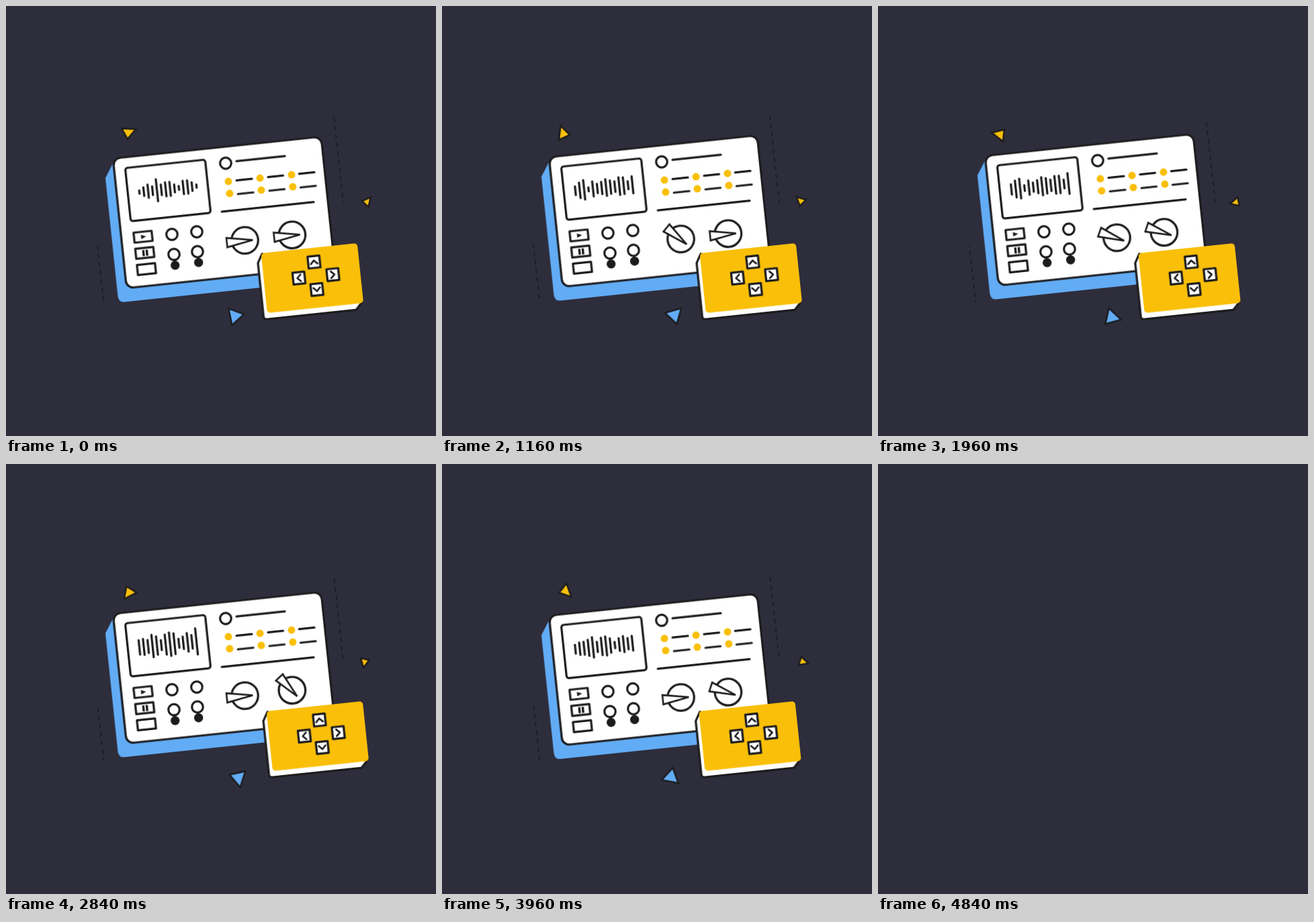
Recreate the animation shown at these times as an HTML page without scripts. Size 640 by 640 pixels, loop 4880 ms.

```html
<!DOCTYPE html>
<html lang="en">
<head>
<meta charset="utf-8">
<title>Control panel</title>
<style>
  :root { --ink: #1c1c1e; --blue: #62acf5; --gold: #fabf08; --loop: 4.88s; --sine: cubic-bezier(.37, 0, .63, 1); }
  html, body { margin: 0; width: 100%; height: 100%; overflow: hidden; background: #2e2d3c; }
  svg { display: block; width: 100%; height: 100%; }

  .line { fill: none; stroke: var(--ink); stroke-width: 3.2; stroke-linecap: round; stroke-linejoin: round; }
  .paper { fill: #fff; }
  .ink { fill: var(--ink); }
  .gold { fill: var(--gold); }
  .blue { fill: var(--blue); }

  .scene { animation: vanish var(--loop) step-end infinite; }
  .lift { animation: lift var(--loop) var(--sine) infinite; }
  .slide { animation: slide var(--loop) var(--sine) infinite; }
  .spin { stroke: var(--ink); stroke-width: 2.5; animation: spin var(--loop) linear infinite; }
  .spin.blue { animation-direction: reverse; }
  .dash { stroke: var(--ink); stroke-width: 1.7; stroke-dasharray: 6.6 5.95; animation: crawl var(--loop) linear infinite; }
  .pointer { stroke-width: 2.6; stroke-linejoin: miter; }
  .first { animation: turn-first var(--loop) var(--sine) infinite; }
  .second { animation: turn-second var(--loop) var(--sine) infinite; }
  .bars rect { width: 3.2px; rx: 1.6px; fill: var(--ink); animation: level var(--loop) var(--sine) infinite; }

  @keyframes vanish { 99.18%, to { visibility: hidden; } }
  @keyframes lift { 50% { transform: translateY(-4.3px); } }
  @keyframes slide { 50% { transform: translateX(8.6px); } }
  @keyframes spin { to { transform: rotate(-360deg); } }
  @keyframes crawl { from { stroke-dashoffset: -.8; } to { stroke-dashoffset: 11.75; } }
  @keyframes turn-first {
    0%, 58.2%, to { transform: rotate(0deg); }
    24.6% { transform: rotate(45deg); }
  }
  @keyframes turn-second {
    0%, 22.1%, 99.2%, to { transform: rotate(0deg); }
    60.7% { transform: rotate(53deg); }
  }
  /* Each bar eases between three lengths, centred on the axis. */
  @keyframes level {
    0%, 98.4%, to { height: var(--a); y: calc(var(--a) / -2); }
    32.8% { height: var(--b); y: calc(var(--b) / -2); }
    63.5% { height: var(--c); y: calc(var(--c) / -2); }
  }
</style>
</head>
<body>
<svg viewBox="0 0 640 640" xmlns="http://www.w3.org/2000/svg">
  <defs>
    <g id="entry">
      <circle class="gold" r="5.5"/>
    </g>
    <rect id="button" class="line" x="-13.5" y="-7.5" width="27" height="15"/>
    <circle id="ring" class="line" r="8.3"/>
    <g id="plug">
      <use href="#ring"/>
      <path class="line" d="M0 9V14"/>
      <circle class="ink" cy="16.3" r="6.7"/>
    </g>
    <g id="arrow">
      <rect class="line paper" x="-8.8" y="-8.8" width="17.6" height="17.6" stroke-linejoin="miter"/>
      <path class="line" style="stroke-width:2.6" d="M-5 2.8L0-2.4L5 2.8"/>
    </g>
  </defs>

  <g class="scene">
    <path class="dash" d="M488 165L502 293"/>
    <path class="dash" d="M136 356L145.5 442"/>

    <g transform="translate(182.2 189.8)"><path class="spin gold" d="M-10-7.4L11.1-6.5L-1.3 8Z"/></g>
    <g transform="translate(535 292.5)"><path class="spin gold" d="M-5.1-2.2L7.7-7.8L4.5 6.6Z"/></g>
    <g transform="translate(344 463.5)"><path class="spin blue" d="M-12.7-13.1L10.3-4.7L-7.6 11.5Z"/></g>

    <g class="lift">
      <g transform="translate(159.2 227) rotate(-6)">
        <path class="blue" d="M0 6L-14.2 27.7V204Q-14.2 214-5 214H290V190H0Z"/>
        <rect class="line paper" width="311.5" height="194" rx="11"/>

        <rect class="line" x="16.6" y="16" width="119.6" height="79.6" rx="3.5"/>
        <g class="bars" transform="translate(32.3 53.8)">
          <rect style="--a:8px;--b:17.5px;--c:25px"/>
          <rect x="6.57" style="--a:16px;--b:28.5px;--c:27px"/>
          <rect x="13.14" style="--a:23px;--b:34px;--c:22px"/>
          <rect x="19.71" style="--a:16px;--b:7.5px;--c:39px"/>
          <rect x="26.28" style="--a:36px;--b:23.5px;--c:31px"/>
          <rect x="32.85" style="--a:19px;--b:17px;--c:18px"/>
          <rect x="39.42" style="--a:24px;--b:21px;--c:34px"/>
          <rect x="45.99" style="--a:24px;--b:29px;--c:39px"/>
          <rect x="52.56" style="--a:15px;--b:25px;--c:35px"/>
          <rect x="59.13" style="--a:9px;--b:21px;--c:16px"/>
          <rect x="65.7" style="--a:23px;--b:31px;--c:21px"/>
          <rect x="72.27" style="--a:23px;--b:29px;--c:31px"/>
          <rect x="78.84" style="--a:16px;--b:15px;--c:24px"/>
          <rect x="85.41" style="--a:8px;--b:33px;--c:43px"/>
        </g>

        <use href="#ring" x="166.1" y="24.5"/>
        <path class="line" d="M182.4 23.2H254.8M152.9 95.7H290.3"/>
        <use href="#entry" x="167.3" y="51.8"/>
        <use href="#entry" x="214.6" y="51.8"/>
        <use href="#entry" x="261.8" y="51.8"/>
        <use href="#entry" x="167.3" y="69.8"/>
        <use href="#entry" x="214.6" y="69.8"/>
        <use href="#entry" x="261.8" y="69.8"/>
        <path class="line" d="M179.5 51.7h23m24.2 0h22.5m24 0h22.8M179.5 72h23m24.2 0h22.5m24 0h22.8"/>

        <use href="#button" x="32.4" y="120.5"/>
        <use href="#button" x="32.4" y="144.7"/>
        <use href="#button" x="32.4" y="168.9"/>
        <path class="ink" d="M29.4 117.2L37 120.6L29.4 123.8ZM28.8 140.3h3.4v9h-3.4ZM34 140.3h3.4v9h-3.4Z"/>

        <use href="#ring" x="75.5" y="121.5"/>
        <use href="#ring" x="112.7" y="121.5"/>
        <use href="#plug" x="75.4" y="151.4"/>
        <use href="#plug" x="110.6" y="151"/>

        <g transform="translate(182.5 141.6)">
          <circle class="line" r="19.8"/>
          <path class="line paper pointer first" d="M-27-6.4V7.6L11.8.7Z"/>
        </g>
        <g transform="translate(253.3 141)">
          <circle class="line" r="19.8"/>
          <path class="line paper pointer second" d="M-27-6.4V7.6L11.8.7Z"/>
        </g>
      </g>
    </g>

    <g class="slide">
      <g transform="translate(379.5 368) rotate(-6)">
        <path class="line paper" d="M1.5 1L-6 14V94Q-6 98.6-1.5 98.6H132L142 88V40Z"/>
        <rect class="gold" width="144" height="89.5" rx="5"/>
        <use href="#arrow" transform="translate(77.1 21.2)"/>
        <use href="#arrow" transform="translate(103.1 42.8) rotate(90)"/>
        <use href="#arrow" transform="translate(77.1 62.4) rotate(180)"/>
        <use href="#arrow" transform="translate(52.3 42.6) rotate(-90)"/>
      </g>
    </g>
  </g>
</svg>
</body>
</html>
```
